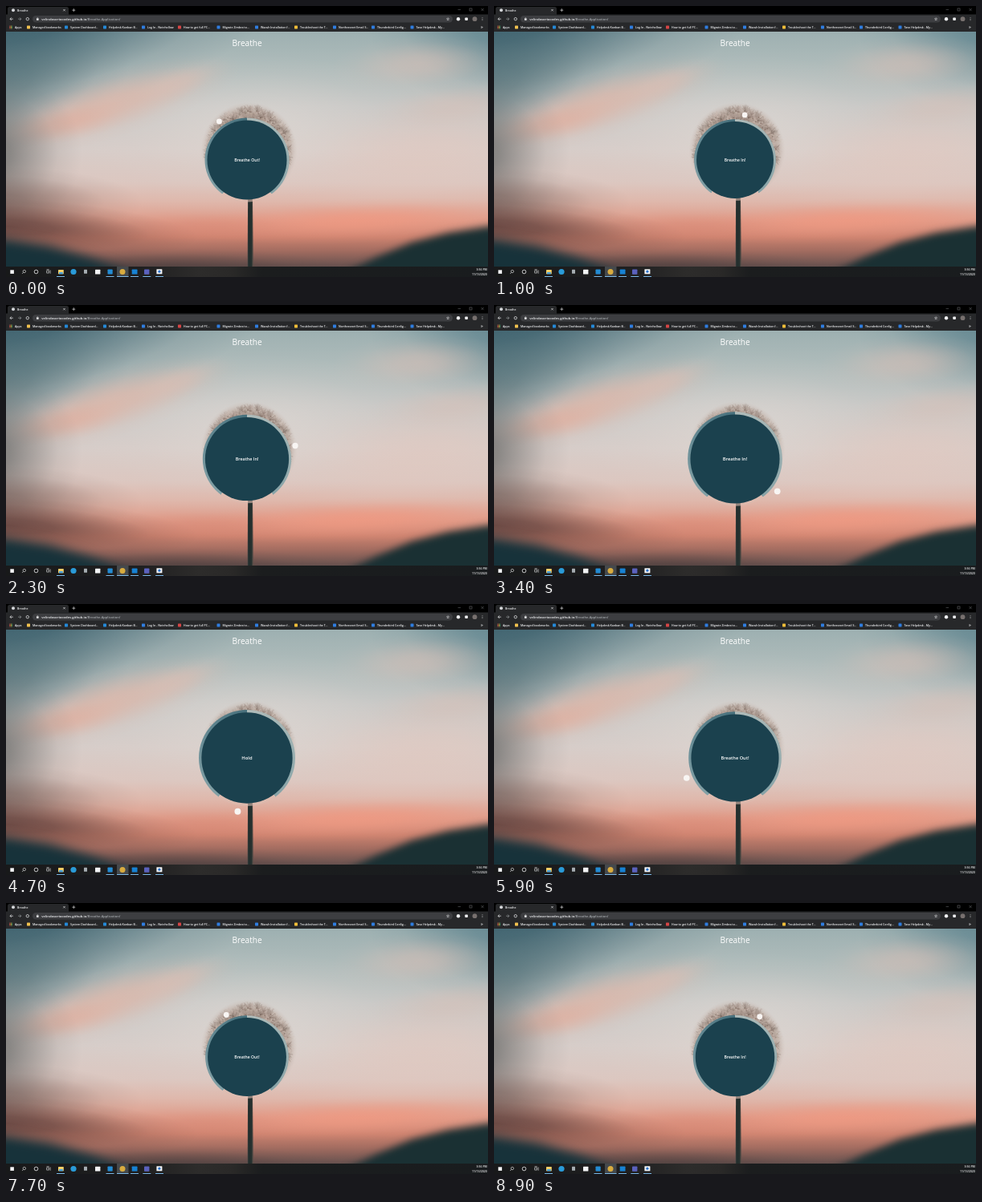
An HTML page with a canvas for the animation above (9000 ms loop, 600x338 px).

```html
<!DOCTYPE html>
<html lang="en">
<head>
<meta charset="utf-8">
<title>Breathe</title>
<style>
html, body { margin: 0; width: 100%; height: 100%; overflow: hidden; background: #000; }
canvas { display: block; width: 600px; height: 338px; }
</style>
</head>
<body>
<canvas id="stage"></canvas>
<script>
const W = 600, H = 338, LOOP = 9000, STEP = 100;
const CX = 300, CY = 192;
const FONT = '"Open Sans", "Noto Sans", sans-serif';
const TAU = Math.PI * 2;
const dpr = window.devicePixelRatio || 1;

function setup(canvas) {
  canvas.width = Math.round(W * dpr);
  canvas.height = Math.round(H * dpr);
  const c = canvas.getContext('2d');
  c.scale(dpr, dpr);
  return c;
}

const ctx = setup(document.getElementById('stage'));
const scene = document.createElement('canvas');
const g = setup(scene);

let seed = 11;
function rnd() {
  seed = (seed * 16807) % 2147483647;
  return seed / 2147483647;
}

function rect(x, y, w, h, color) {
  g.fillStyle = color;
  g.fillRect(x, y, w, h);
}

function pill(x, y, w, h, r, color) {
  g.fillStyle = color;
  g.beginPath();
  g.roundRect(x, y, w, h, r);
  g.fill();
}

function disc(c, x, y, r, color) {
  c.fillStyle = color;
  c.beginPath();
  c.arc(x, y, r, 0, TAU);
  c.fill();
}

function line(color, width, ...pts) {
  g.strokeStyle = color;
  g.lineWidth = width;
  g.beginPath();
  for (let i = 0; i < pts.length; i += 2) g.lineTo(pts[i], pts[i + 1]);
  g.stroke();
}

function ring(x, y, r, color, width) {
  g.strokeStyle = color;
  g.lineWidth = width;
  g.beginPath();
  g.arc(x, y, r, 0, TAU);
  g.stroke();
}

function text(c, str, x, y, size, color, align = 'left', weight = 600) {
  c.font = `${weight} ${size}px ${FONT}`;
  c.textAlign = align;
  c.fillStyle = color;
  c.fillText(str, x, y);
}

function stops(grad, list) {
  list.forEach(([p, c]) => grad.addColorStop(p, c));
  return grad;
}

// Soft elliptical glow, rgb given as "r,g,b"
function glow(x, y, rx, ry, rgb, alpha, tilt = 0) {
  g.save();
  g.translate(x, y);
  g.rotate(tilt);
  g.scale(rx, ry);
  const grad = g.createRadialGradient(0, 0, 0, 0, 0, 1);
  for (let i = 0; i <= 4; i++) {
    const a = alpha * (0.5 + 0.5 * Math.cos(Math.PI * i / 4));
    grad.addColorStop(i / 4, `rgba(${rgb},${a.toFixed(3)})`);
  }
  g.fillStyle = grad;
  g.fillRect(-1, -1, 2, 2);
  g.restore();
}

// Blurred ridge through the given points, closed below the stage
function hill(color, blur, ...pts) {
  g.save();
  g.filter = `blur(${blur * dpr}px)`;
  g.fillStyle = color;
  g.beginPath();
  g.moveTo(pts[0], 380);
  for (let i = 0; i < pts.length; i += 2) g.lineTo(pts[i], pts[i + 1]);
  g.lineTo(pts[pts.length - 2], 380);
  g.fill();
  g.restore();
}

function drawSky() {
  g.save();
  g.beginPath();
  g.rect(0, 32, W, 294);
  g.clip();
  const sky = stops(g.createLinearGradient(0, 32, 0, 326),
    [[0, '#9db0b1'], [0.15, '#b0bcbb'], [0.32, '#c8c8c6'], [0.5, '#d7cdc9'],
     [0.64, '#dcc7c0'], [0.72, '#dfb8ac'], [0.8, '#de9d8b'], [0.87, '#cd8370'],
     [0.93, '#a26c60'], [1, '#64504e']]);
  rect(0, 32, W, 294, sky);

  glow(0, 15, 340, 125, '42,82,98', 0.85, -0.12);
  glow(-10, 95, 170, 90, '70,102,110', 0.6, -0.25);
  glow(620, 20, 170, 110, '84,124,136', 0.75);
  glow(310, 150, 220, 90, '226,219,214', 0.5);
  glow(520, 185, 190, 75, '226,200,191', 0.6, -0.12);

  glow(125, 125, 175, 42, '222,180,165', 0.75, -0.3);
  glow(75, 146, 85, 24, '226,172,155', 0.5, -0.2);
  glow(210, 98, 75, 22, '220,190,179', 0.5, -0.35);
  glow(515, 72, 110, 36, '210,190,182', 0.65, -0.05);
  glow(560, 125, 110, 32, '214,190,181', 0.5, -0.1);

  glow(-25, 185, 120, 105, '102,104,103', 0.8, -0.1);
  glow(-20, 245, 190, 45, '104,86,82', 0.65);
  glow(0, 275, 240, 36, '88,60,57', 0.8, 0.06);
  glow(440, 268, 220, 28, '242,152,128', 0.7, -0.04);
  glow(250, 275, 130, 22, '220,135,115', 0.4);
  glow(200, 328, 220, 26, '66,54,54', 0.5);

  hill('#17323a', 7, -40, 288, 0, 290, 55, 299, 105, 314, 150, 332);
  hill('#1a3033', 5, 425, 332, 460, 314, 505, 295, 550, 283, 600, 275, 640, 271);
  g.restore();
}

function drawFlower() {
  const fuzz = stops(g.createRadialGradient(302.5, 180, 0, 302.5, 180, 60),
    [[0, '#b5a195'], [0.76, 'rgba(176,156,144,.9)'], [0.88, 'rgba(188,172,162,.6)'],
     [1, 'rgba(205,192,185,0)']]);
  disc(g, 302.5, 180, 60, fuzz);
  for (let i = 0; i < 260; i++) {
    const a = -2 + 4 * rnd();
    const r = 36 + 14 * rnd();
    const x = 302.5 + r * Math.sin(a), y = 180 - r * Math.cos(a);
    const tone = Math.round(125 + 95 * rnd());
    g.strokeStyle = `rgba(${tone},${tone - 16},${tone - 25},.38)`;
    g.lineWidth = 0.6;
    g.beginPath();
    for (let j = 0; j < 9; j++) {
      const b = a + (rnd() - 0.5) * 2.2;
      const len = 4.5 + 4.5 * rnd();
      g.moveTo(x, y);
      g.lineTo(x + len * Math.sin(b), y - len * Math.cos(b));
    }
    g.stroke();
    disc(g, x, y, 0.9, 'rgba(112,90,80,.4)');
  }
  const stem = stops(g.createLinearGradient(300, 0, 308, 0),
    [[0, '#5c5350'], [0.25, '#222d2c'], [0.7, '#26312f'], [1, '#68564f']]);
  g.fillStyle = stem;
  g.beginPath();
  g.moveTo(301.2, 225);
  g.lineTo(306.8, 225);
  g.lineTo(308, 326);
  g.lineTo(300.6, 326);
  g.fill();
}

function drawBrowser() {
  const light = '#f1f2f4', grey = '#a4a8ac', dim = '#77797c', bar = '#27282a';
  rect(0, 0, W, 11, '#000');
  pill(2, 1, 76, 14, 2.5, bar);
  disc(g, 9, 5.3, 2, '#d4d6d9');
  text(g, 'Breathe', 14, 6.8, 3.5, light);
  line(light, 0.6, 71.3, 4, 73.7, 6.4);
  line(light, 0.6, 73.7, 4, 71.3, 6.4);
  line(light, 0.6, 82.3, 5.2, 86.3, 5.2);
  line(light, 0.6, 84.3, 3.2, 84.3, 7.2);
  line(dim, 0.5, 562.5, 4.6, 566, 4.6);
  g.lineWidth = 0.5;
  g.strokeRect(577, 3, 3, 3);
  line(dim, 0.5, 591.5, 3, 594.7, 6.2);
  line(dim, 0.5, 594.7, 3, 591.5, 6.2);

  rect(0, 10.5, W, 21.5, bar);
  line(light, 0.7, 8.8, 16.2, 5, 16.2);
  line(light, 0.7, 6.8, 14.4, 5, 16.2, 6.8, 18);
  line(grey, 0.6, 15, 16.2, 18.8, 16.2);
  line(grey, 0.6, 17, 14.4, 18.8, 16.2, 17, 18);
  ring(26.8, 16.2, 1.7, light, 0.7);
  pill(33, 12, 523, 8.4, 4.2, '#3d3e41');
  rect(38, 15.6, 2.6, 2.2, light);
  ring(39.3, 15.4, 0.8, light, 0.4);
  const host = 'velindasortacodes.github.io';
  text(g, host, 44.3, 17.8, 4.2, light);
  text(g, '/Breathe-Application/', 44.3 + g.measureText(host).width, 17.8, 4.05, grey);
  text(g, '☆', 550, 17.8, 5, light, 'center');
  disc(g, 563, 16.2, 2.2, light);
  pill(571.3, 14.5, 3.6, 3.6, 0.8, light);
  disc(g, 583.5, 16.2, 2.9, '#77706e');
  for (let i = -1; i < 2; i++) disc(g, 593, 16.2 + i * 1.5, 0.45, light);

  for (let i = 0; i < 9; i++) {
    const colors = ['#e05a4e', '#e6b93f', '#4f9b62'];
    rect(4.3 + (i % 3) * 1.4, 24.6 + Math.floor(i / 3) * 1.4, 1, 1, colors[i % 3]);
  }
  text(g, 'Apps', 11, 27.8, 3.5, light);
  const blue = '#2f7de0';
  [[28, '#f2c14e', 'Managed bookmarks'], [75, '#2489d8', 'System Dashboard...'],
   [123, '#2489d8', 'Helpdesk Kanban B...'], [171, blue, 'Log In - Notehollow'],
   [216, '#d64545', 'How to get full PC...'], [264.5, blue, 'Migrate Zimbra to...'],
   [312, blue, 'Wazuh Installation f...'], [361, '#f0bd38', 'Troubleshoot the T...'],
   [409, blue, 'Northvexnet Email S...'], [457, blue, 'Thunderbird Config...'],
   [505.5, blue, 'Tavo Helpdesk - My...']].forEach(([x, color, label]) => {
    pill(x - 2, 24.4, 4, 4, 0.6, color);
    text(g, label, x + 5, 27.8, 3.5, light);
  });
  text(g, '»', 592.5, 27.8, 5, light, 'center');
}

function drawTaskbar() {
  const white = '#f2f3f4';
  rect(0, 325, W, 13, stops(g.createLinearGradient(0, 0, W, 0),
    [[0, '#18191a'], [0.28, '#1f1f20'], [0.4, '#2d2c2b'], [0.47, '#2a2928'],
     [0.53, '#1b1d1e'], [1, '#191c1e']]));
  rect(138, 325, 14.5, 13, '#45494c');
  rect(5.3, 329.3, 4.6, 4.6, white);
  ring(22.8, 331, 1.7, white, 0.6);
  line(white, 0.6, 21.6, 332.3, 20, 334);
  ring(37.5, 331.5, 2.3, white, 0.8);
  g.strokeStyle = white;
  g.lineWidth = 0.6;
  g.strokeRect(50.8, 330, 2.7, 3);
  line(white, 0.6, 55.2, 329.5, 55.2, 333.7);
  line(white, 0.5, 50.5, 328.6, 53.7, 328.6);
  pill(65, 329, 6.8, 5.3, 0.6, '#f4cf68');
  rect(66, 332, 4.8, 2.3, '#4aa3df');
  disc(g, 84, 331.5, 3.6, '#2a9bd8');
  pill(97, 328.8, 4, 5, 0.5, '#a6adb2');
  pill(111, 328.8, 6.4, 5.8, 0.5, white);
  pill(126.5, 328.4, 6.2, 6.2, 0.8, '#238bd3');
  disc(g, 145, 331.5, 3.5, '#d9ac3f');
  pill(156.7, 328.6, 6.8, 6, 0.7, '#1782d4');
  pill(172, 328.5, 6.4, 6.2, 0.8, '#5b61bd');
  pill(187.4, 328.3, 7, 6, 0.5, white);
  disc(g, 190.9, 331.2, 1.6, '#2d72c9');
  [[63, 10], [124.5, 10], [138, 14.5], [155, 10], [170.3, 10], [186, 10]]
    .forEach(([x, w]) => rect(x, 337, w, 1, '#79b6e4'));
  text(g, '3:56 PM', 598.8, 330, 3.5, white, 'right');
  text(g, '11/13/2020', 598.8, 336, 3.5, white, 'right');
}

drawSky();
drawFlower();
drawBrowser();
drawTaskbar();
text(g, 'Breathe', 300, 49.8, 10.1, '#fff', 'center', 400);

// Breathing cycle: 3 s in, 1.5 s hold, 3 s out
const CYCLE = 7500, OFFSET = 6755;

function breathe(p) {
  if (p < 3000) return { label: 'Breathe In!', scale: 1 + 0.2 * p / 3000 };
  if (p < 4500) return { label: 'Hold', scale: 1.2 };
  return { label: 'Breathe Out!', scale: 1.2 - 0.2 * (p - 4500) / 3000 };
}

const halo = stops(ctx.createConicGradient(-Math.PI / 2, 0, 0),
  [[0, '#b0bcba'], [0.2, '#9cb1b2'], [0.4, '#86a2a6'],
   [0.4, 'rgba(221,188,176,.6)'], [0.6, 'rgba(221,188,176,.6)'],
   [0.6, '#84a1a6'], [0.8, '#6a8e97'], [1, '#47707c']]);

function draw(t) {
  const p = (t + OFFSET) % CYCLE;
  const { label, scale } = breathe(p);
  ctx.drawImage(scene, 0, 0, W, H);
  ctx.save();
  ctx.translate(CX, CY);
  ctx.scale(scale, scale);
  disc(ctx, 0, 0, 50, halo);
  disc(ctx, 0, 0, 47.2, '#1b414e');
  text(ctx, label, 0, 1.9, 4.9, '#fff', 'center');
  const a = p / CYCLE * TAU;
  disc(ctx, 56.4 * Math.sin(a), -56.4 * Math.cos(a), 3.3, '#f8f5f3');
  ctx.restore();
}

const start = performance.now();
function frame() {
  const t = (performance.now() - start) % LOOP;
  draw(Math.floor(t / STEP) * STEP);
  requestAnimationFrame(frame);
}
frame();
</script>
</body>
</html>
```
